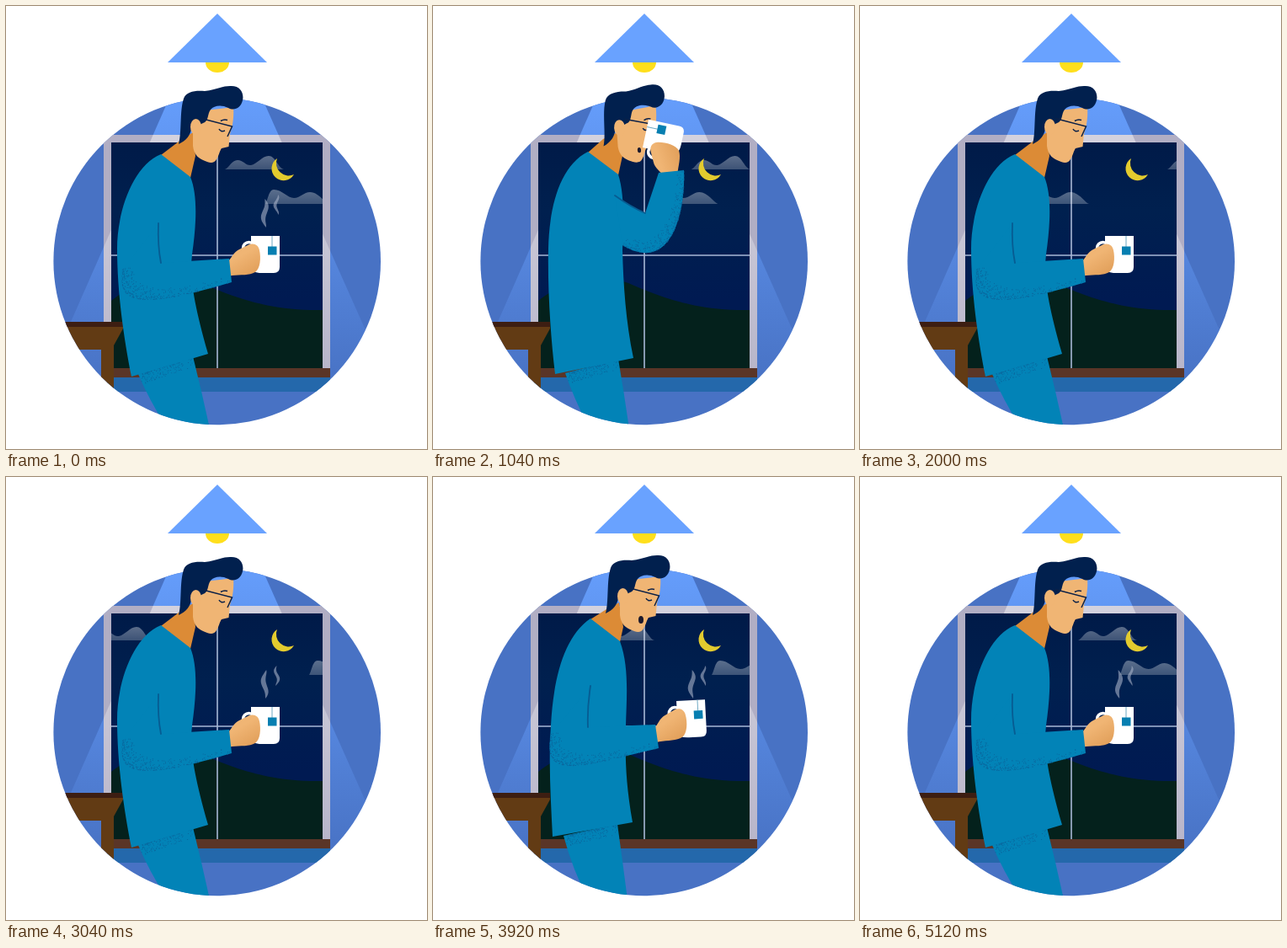
Write an HTML page that moves like this. It is 500x526 px and loops after 5200 ms.

```html
<!DOCTYPE html>
<html lang="en">
<head>
<meta charset="utf-8">
<title>Evening tea</title>
<style>
html, body { margin: 0; width: 100%; height: 100%; overflow: hidden; background: #fff; }
svg { display: block; width: 100vw; height: 100vh; }
</style>
</head>
<body>
<svg viewBox="0 0 500 526">
  <defs>
    <clipPath id="disc"><circle cx="250.7" cy="303" r="194.3"/></clipPath>
    <clipPath id="pane"><path d="M125 162H376V430H125Z"/></clipPath>
    <clipPath id="frame"><path d="M116 153H385V430H116Z"/></clipPath>
    <linearGradient id="beam" gradientUnits="userSpaceOnUse" x1="0" y1="110" x2="0" y2="450">
      <stop stop-color="#659dfb"/><stop offset="1" stop-color="#659dfb" stop-opacity="0"/>
    </linearGradient>
    <linearGradient id="glow" gradientUnits="userSpaceOnUse" x1="0" y1="150" x2="0" y2="430">
      <stop stop-color="#fff" stop-opacity=".45"/><stop offset="1" stop-color="#fff" stop-opacity=".1"/>
    </linearGradient>
    <linearGradient id="sky" x1="0" y1="0" x2="0" y2="1">
      <stop stop-color="#001a48"/><stop offset=".3" stop-color="#00204f"/><stop offset=".7" stop-color="#001a52"/>
    </linearGradient>
    <linearGradient id="mist" x1="0" y1="0" x2="0" y2="1">
      <stop stop-color="#fff" stop-opacity=".36"/><stop offset="1" stop-color="#fff" stop-opacity=".24"/>
    </linearGradient>
    <linearGradient id="skin" x1="0" y1="0" x2=".6" y2="1">
      <stop offset=".45" stop-color="#f0b574"/><stop offset="1" stop-color="#e2a05b"/>
    </linearGradient>
  </defs>

  <path d="M251 9L310 67H192Z" fill="#69a2ff"/>
  <path d="M237 67H265A14 12 0 0 1 237 67Z" fill="#ffdf1c"/>

  <g clip-path="url(#disc)">
    <path d="M50 100H450V500H50Z" fill="#4872c4"/>
    <path id="cone" d="M198 100L44 450H456L300 100Z" fill="url(#beam)"/>
    <path d="M116 153H385V430H116Z" fill="#b1aec4"/>
    <g clip-path="url(#frame)"><path d="M198 100L44 450H456L300 100Z" fill="url(#glow)"/></g>
    <g clip-path="url(#pane)">
      <path d="M125 162H376V430H125Z" fill="url(#sky)"/>
      <path d="M125 350C165 318 205 320 232 329C280 350 320 362 376 361V430H125Z" fill="#04211c"/>
      <path d="M251 162V430M125 296H376" stroke="#a9b8d6" stroke-width="1.6"/>
      <path id="highCloud" fill="url(#mist)" d="M260 194C265 192 268 183 275 183C282 183 285 190 291 189C298 188 304 178 312 178C320 178 323 192 330 194Z"/>
      <path id="lowCloud" fill="url(#mist)" d="M308 235C311 231 312 218 318 218C328 218 334 228 342 228C349 228 354 221 361 221C371 221 378 233 383 235Z"/>
      <path d="M322 181A14.2 14.2 0 1 0 342 200A14.8 14.8 0 0 1 322 181Z" fill="#e3cb2e"/>
    </g>
    <path d="M120 441H385V458H120Z" fill="#2468ab"/>
    <path d="M120 430H385V441H120Z" fill="#5a3527"/>
    <path d="M50 378H139V383L128 403V470H113V408H50Z" fill="#623b14"/>
    <path d="M50 375H139V381H50Z" fill="#3d1e12"/>
    <path id="legs" fill="#0283b7"/>
    <path id="hemGrain" class="grain"/>
  </g>

  <path id="steam" fill="#a9b2c8"/>
  <path id="neck" fill="#dc8b36"/>
  <path id="coat" fill="#0283b7"/>
  <g id="head">
    <path d="M236 124L270 120C271 132 269 144 266 152L264.500 167L256 169C253 173 253 178 250 182C247 188 240 186 234 183C227 180 223 175 222 166V148Z" fill="#f0b574"/>
    <path d="M205 164C209 150 206 125 211 110C214 101 226 100 236 101C248 100 256 95 266 95C278 94 283 103 281 112C279 121 271 125 264 121C256 117 247 118 243 123C239 128 241 137 234 139L220 146C219 153 214 160 205 164Z" fill="#01204e"/>
    <ellipse cx="225.500" cy="143.500" rx="6.500" ry="9.500" fill="#f0b574"/>
    <path d="M232 133.500L268.500 143L263 155M253 146Q255 150 260 148M255 136.500Q259 134 263 135.500" fill="none" stroke="#0b2047" stroke-width="1.5"/>
    <ellipse id="mouth" cx="247" cy="171.500" rx="3" ry="4.500" fill="#1d1a2c"/>
  </g>
  <g id="cup">
    <circle cx="-2.500" cy="14.500" r="7" fill="none" stroke="#fff" stroke-width="3.500"/>
    <path d="M0 0H34V37Q34 44 27 44H13Q0 44 0 36Z" fill="#fff"/>
    <path d="M25 0V13" stroke="#6fa9c4"/>
    <path d="M20 12.500H30.500V22.500H20Z" fill="#077fb1"/>
    <path d="M-28 31C-24 28 -21 19 -14 16L-2 10C4 8 9 11 10 17C12 26 11 39 5 43C-2 47 -12 46 -23 47L-30 49Z" fill="url(#skin)"/>
  </g>
  <path id="arm" fill="#0283b7"/>
  <path id="armGrain" class="grain"/>
  <path id="fold" fill="none" stroke="#075c92" stroke-width="1.8" stroke-linecap="round"/>
</svg>
<script>
const LOOP = 5200, STEP = 80;
const el = Object.fromEntries([...document.querySelectorAll('svg [id]')].map(e => [e.id, e]));
document.querySelectorAll('.grain').forEach(e => {
  e.setAttribute('stroke', '#0a659b');
  e.setAttribute('stroke-linecap', 'round');
});

// Each pose uses the same path structure, so numbers can be blended pairwise.
const rest = {
  coat: 'M184 176C150 190 132 245 132 288C132 340 140 395 149 440L240 413C222 350 218 320 221 295C226 260 228 225 219 203Z',
  arm: 'M181 258Q180 285 184 305L265 300L268 328C160 360 130 355 139 312Z',
  neck: 'M222 150L205 161L184 177L219 204L225 178Z',
  legs: 'M157 437L222 416Q233 460 242 502L192 502Q171 470 157 437Z',
  cup: 'translate(291 273) rotate(0)',
  head: 'translate(0 0) rotate(0 240 186)',
  mouth: 'scale(0)'
};
const lift = {
  coat: 'M184 174C152 190 138 245 136 290C134 340 140 395 146 439L239 416C229 370 224 330 225 295C228 265 230 225 222 203Z',
  arm: 'M210 236Q222 250 238 266L274 225L301 236C280 285 262 330 222 308Z',
  neck: 'M221 150L204 160L184 175L222 204L225 178Z',
  legs: 'M157 437L221 417Q229 460 236 502L188 502Q170 470 157 437Z',
  cup: 'translate(264 193) rotate(-60)',
  head: 'translate(-1 0) rotate(0 240 186)',
  mouth: 'scale(0)'
};
const sip = {
  coat: 'M184 173C150 190 138 240 137 288C136 340 140 395 145 437L238 418C229 375 226 330 225 290C226 260 228 225 220 200Z',
  arm: 'M216 225Q234 238 252 246L268 198L298 195C300 240 285 320 225 284Z',
  neck: 'M219 150L202 158L184 174L220 201L225 178Z',
  legs: 'M157 436L220 419Q227 460 233 502L186 502Q169 470 157 436Z',
  cup: 'translate(249 168) rotate(-78)',
  head: 'translate(-1 0) rotate(-4 240 186)',
  mouth: 'scale(.7)'
};
const blow = {
  coat: 'M187 168C155 190 143 240 140 295C137 340 140 385 142 427L237 410C229 365 228 335 229 295C230 260 233 225 222 195Z',
  arm: 'M187 248Q183 275 184 297L264 294L268 322C170 345 130 360 140 305Z',
  neck: 'M221 149L206 157L187 169L222 196L226 178Z',
  legs: 'M155 426L219 412Q225 455 231 502L185 502Q167 470 155 426Z',
  cup: 'translate(289 266) rotate(-3)',
  head: 'translate(0 -2) rotate(0 240 186)',
  mouth: 'scale(1)'
};

const ease = {
  in: u => u * u,
  out: u => 1 - (1 - u) ** 2,
  both: u => u * u * (3 - 2 * u)
};
const acting = [
  [0, rest, 'in'], [640, lift, 'out'], [1000, sip, 'both'], [1600, sip, 'in'],
  [1820, lift, 'out'], [2000, rest, 'both'], [3040, rest, 'both'],
  [3600, blow, 'both'], [4000, blow, 'both'], [4480, rest, 'both'], [LOOP, rest, 'both']
];
const highDrift = [[0, 0], [640, 20], [1600, 84], [2000, 105], [2250, 118], [2251, -240],
  [2600, -205], [3040, -157], [3920, -67], [4560, -22], [5040, -2], [LOOP, 0]];
const lowDrift = [[0, 0], [640, -18], [1600, -82], [2000, -111], [2400, -165], [2401, 70],
  [3040, 52], [3920, 23], [4560, 8], [5040, 1], [LOOP, 0]];
const steamLevel = [[0, 1], [80, 1], [400, 0], [2320, 0], [2720, 1], [LOOP, 1]];

const numbers = s => s.match(/-?[\d.]+/g).map(Number);
const lerp = (a, b, u) => a + (b - a) * u;

function blend(a, b, u) {
  const target = numbers(b);
  let i = 0;
  return a.replace(/-?[\d.]+/g, n => lerp(+n, target[i++], u).toFixed(2));
}

function segment(keys, t) {
  const i = keys.findIndex((k, n) => n && t < k[0]);
  const from = keys[i - 1], to = keys[i];
  return [from, to, (t - from[0]) / (to[0] - from[0])];
}

function track(keys, t) {
  const [from, to, u] = segment(keys, t);
  return lerp(from[1], to[1], u);
}

function seeded(seed) {
  return () => (seed = seed * 16807 % 2147483647) / 2147483647;
}

const dot = (x, y) => `M${x.toFixed(1)} ${y.toFixed(1)}h.1`;

function bezier(a, b, c, d, u) {
  const v = 1 - u;
  return v * v * v * a + 3 * v * v * u * b + 3 * v * u * u * c + u * u * u * d;
}

// Dots crowd the outer edge of the sleeve and thin out toward the inner elbow.
function sleeveGrain(arm) {
  const p = numbers(arm), random = seeded(71);
  let d = '';
  for (let i = 0; i < 330; i++) {
    const u = random(), depth = .3 * random() ** 2;
    const x = bezier(p[8], p[10], p[12], p[14], u);
    const y = bezier(p[9], p[11], p[13], p[15], u);
    d += dot(lerp(x, lerp(p[4], p[6], 1 - u), depth), lerp(y, lerp(p[5], p[7], 1 - u), depth));
  }
  return d;
}

function hemGrain(legs) {
  const p = numbers(legs), random = seeded(29);
  let d = '';
  for (let i = 0; i < 170; i++) {
    const u = random();
    d += dot(lerp(p[0] + 4, p[2], u), lerp(p[1], p[3], u) + 13 * random() ** 2);
  }
  return d;
}

function wisp(x, top, bottom, width, phase) {
  const left = [], right = [];
  for (let i = 0; i <= 14; i++) {
    const u = i / 14, y = lerp(top, bottom, u);
    const cx = x + 2 * Math.sin(u * 7 + phase), half = width * Math.sin(Math.PI * u) ** .7;
    left.push(`${(cx - half).toFixed(1)} ${y.toFixed(1)}`);
    right.unshift(`${(cx + half).toFixed(1)} ${y.toFixed(1)}`);
  }
  return `M${[...left, ...right].join('L')}Z`;
}

function draw(t) {
  const [from, to, u] = segment(acting, t);
  const pose = {};
  for (const part in rest) pose[part] = blend(from[1][part], to[1][part], ease[from[2]](u));

  for (const part of ['coat', 'arm', 'neck', 'legs']) el[part].setAttribute('d', pose[part]);
  el.cup.setAttribute('transform', pose.cup);
  el.head.setAttribute('transform', pose.head);
  el.mouth.setAttribute('transform', `translate(247 171.5) ${pose.mouth} translate(-247 -171.5)`);
  el.fold.setAttribute('d', pose.arm.split('L')[0]);
  el.armGrain.setAttribute('d', sleeveGrain(pose.arm));
  el.hemGrain.setAttribute('d', hemGrain(pose.legs));

  el.highCloud.setAttribute('transform', `translate(${track(highDrift, t)})`);
  el.lowCloud.setAttribute('transform', `translate(${track(lowDrift, t)})`);

  const level = track(steamLevel, t), phase = t / LOOP * 8 * Math.PI;
  const rise = t > 2000 ? 25 * (1 - level) : 0;
  el.steam.setAttribute('d', wisp(307.5, 229 + rise, 263 + rise, 3, phase) +
    wisp(321.5, 224 + rise, 248 + rise, 1.9, phase + 1));
  el.steam.setAttribute('opacity', .6 * level);
}

function tick() {
  draw(Math.floor(performance.now() % LOOP / STEP) * STEP);
  requestAnimationFrame(tick);
}
tick();
</script>
</body>
</html>
```
